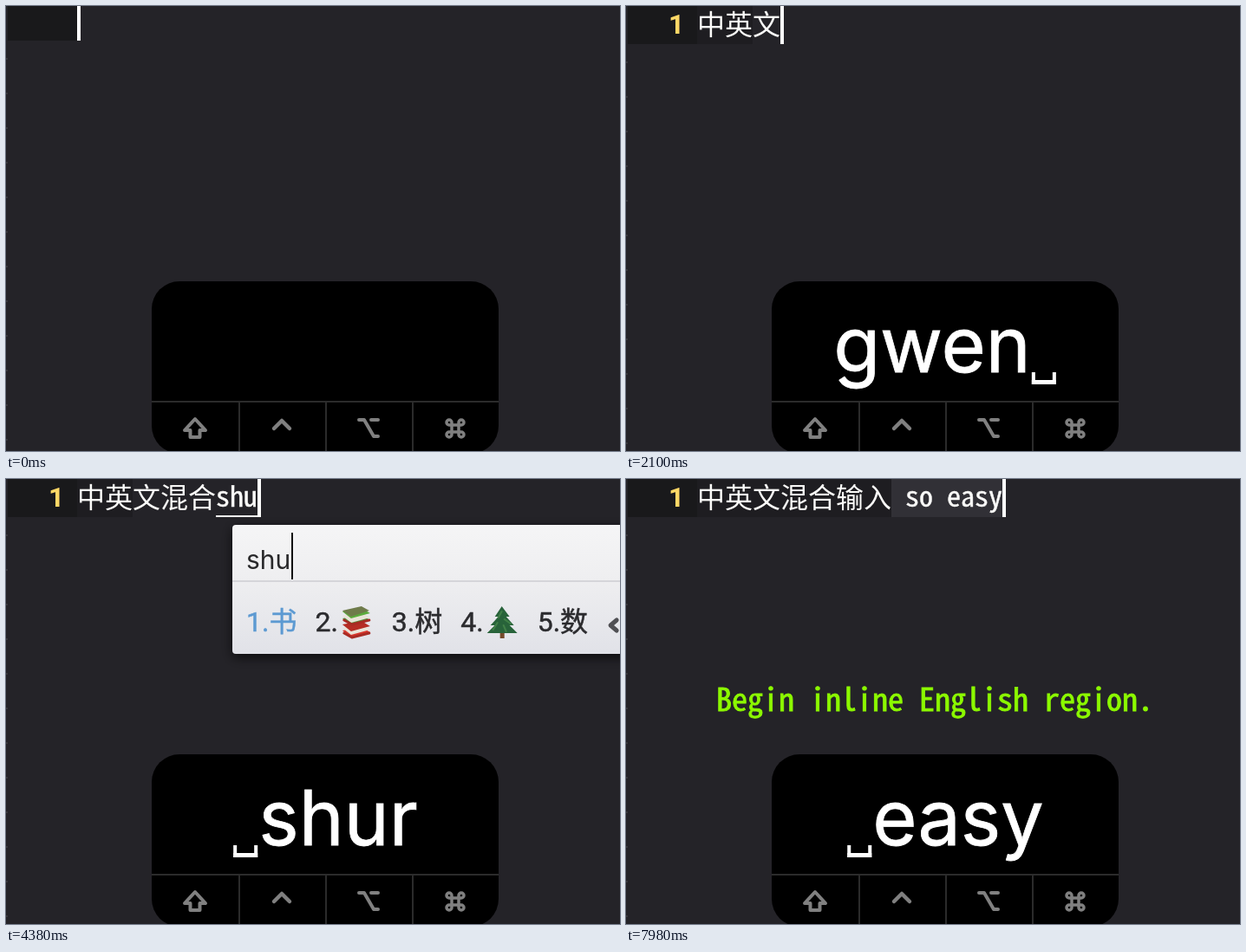
Recreate the animation shown at these times as an HTML page with a canvas. Size 708 by 514 pixels, loop 8 s.

```html
<!DOCTYPE html>
<html lang="zh-CN">
<head>
<meta charset="utf-8">
<style>
  html, body { margin: 0; width: 708px; height: 514px; overflow: hidden; background: #242328; }
  canvas { display: block; }
</style>
</head>
<body>
<canvas id="stage" width="708" height="514"></canvas>
<script>
const ctx = document.getElementById('stage').getContext('2d');
const LOOP = 8000, LAG = 60, LEFT = 82, CELL = 16;
const MONO = '"Noto Sans Mono CJK SC", "Noto Sans CJK SC", monospace';
const CJK = '"Noto Sans CJK SC", sans-serif';
const SANS = 'Roboto, ' + CJK;
const UI = 'Inter, sans-serif';

const KEYS = 'zhongyingwen hunhe shuru  so easy';
const TIMES = [60, 240, 420, 600, 780, 960, 1140, 1260, 1380, 1560, 1680, 1800, 1980,
  2760, 2940, 3120, 3360, 3480, 3660, 4020, 4140, 4260, 4380, 4500, 4740,
  5100, 5820, 6180, 6720, 7080, 7200, 7380, 7680];
const WORDS = [["zhong'ying'wen", '中英文'], ["hun'he", '混合'], ["shu'ru", '输入']];
const POPUP_AT = 2520, MESSAGE_AT = 5880;

const CANDIDATES = {
  "z": '在 子 自 怎 走',
  "zh": '这 着 中 只 中国',
  "zho": '中 周 种 重 中国',
  "zhon": '中 种 重 众 钟',
  "zhong": '中 种 重 众 钟',
  "zhong'y": '重要 终于 中央 中有 中医',
  "zhong'yi": '中医 中意 忠义 重义 中一',
  "zhong'yin": '中音 重音 中英 终因 中印',
  "zhong'ying": '中英 中影 中营 重影 中应',
  "zhong'ying'w": '中英文 中英 中影 中 种',
  "zhong'ying'we": '中英文 中英 中影 中 种',
  "zhong'ying'wen": '中英文 中英 中影 中 种',
  "h": '和 好 会 还 很',
  "hu": '会 或 湖 户 胡',
  "hun": '混 婚 魂 昏 hung',
  "hun'h": '混合 婚后 混好 混 婚',
  "hun'he": '混合 浑河 混 婚 魂',
  "s": '是 说 上 时 三',
  "sh": '是 说 上 时 事',
  "shu": '书 📚 树 🌲 数',
  "shu'r": '输入 熟人 树人 书 数',
  "shu'ru": '输入 书入 书 树 数',
};

function rect(x, y, w, h, color) {
  ctx.fillStyle = color;
  ctx.fillRect(x, y, w, h);
}

function text(s, x, y, font, color, weight = 0) {
  ctx.font = font;
  ctx.fillStyle = ctx.strokeStyle = color;
  ctx.fillText(s, x, y);
  if (weight) {
    ctx.lineWidth = weight;
    ctx.strokeText(s, x, y);
  }
  return ctx.measureText(s).width;
}

function line(d, x, y, width, color) {
  ctx.save();
  ctx.translate(x, y);
  ctx.lineWidth = width;
  ctx.lineCap = ctx.lineJoin = 'round';
  ctx.strokeStyle = color;
  ctx.stroke(new Path2D(d));
  ctx.restore();
}

function shape(d, x, y, color) {
  ctx.save();
  ctx.translate(x, y);
  ctx.fillStyle = color;
  ctx.fill(new Path2D(d));
  ctx.restore();
}

const typedBy = t => TIMES.filter(k => k <= t).length;

// Committed text and pending syllables after n keystrokes
function compose(n) {
  let done = '';
  for (const [word, out] of WORDS) {
    const size = word.replace(/'/g, '').length;
    if (n <= size) {
      return { done, pending: n ? word.match(new RegExp(`^(?:'?\\w){${n}}`))[0] : '', direct: '' };
    }
    n -= size + 1;
    done += out;
  }
  return { done, pending: '', direct: KEYS.slice(-8).slice(0, n) };
}

function books(x, y) {
  const layers = [['#d8362c', 24], ['#e9e4d8', 21], ['#b52d25', 17], ['#4f8f3a', 10], ['#e9e4d8', 7], ['#5cab3d', 2]];
  layers.forEach(([color, dy]) => shape('M2 4 L24 0 L34 6 L12 12 Z', x, y + dy, color));
  line('M4 8 L13 13 L33 8 M4 23 L13 28 L33 23', x, y + 8, 3, '#a82b24');
  shape('M2 4 L24 -1 L33 4 L12 11 Z', x, y + 1, '#6f7b4b');
}

function tree(x, y) {
  rect(x + 15, y + 28, 5, 9, '#74492a');
  shape('M17 0 L26 12 L22 12 L31 22 L26 22 L35 31 L0 31 L9 22 L4 22 L13 12 L9 12 Z', x, y, '#28633a');
  line('M17 6 L13 13 M20 15 L27 20 M12 19 L7 27 M19 22 L22 29', x, y, 2, '#418047');
}

function panel(pending, x, y) {
  const font = '32px ' + SANS;
  const items = CANDIDATES[pending].split(' ').map((s, i) => `${i + 1}.${s}`);
  const isIcon = s => /[📚🌲]/u.test(s);
  ctx.font = font;
  const widths = items.map(s => isIcon(s) ? ctx.measureText('2.').width + 41 : ctx.measureText(s).width);
  const end = x + 16 + widths.reduce((a, b) => a + b + 21);

  const fill = ctx.createLinearGradient(0, y, 0, y + 149);
  fill.addColorStop(0, '#f5f5f6');
  fill.addColorStop(.44, '#eeeef0');
  fill.addColorStop(1, '#e1e2e8');
  ctx.save();
  ctx.shadowColor = 'rgba(0,0,0,.65)';
  ctx.shadowBlur = 14;
  ctx.shadowOffsetY = 4;
  ctx.fillStyle = fill;
  ctx.beginPath();
  ctx.roundRect(x, y, end + 78 - x, 149, 4);
  ctx.fill();
  ctx.restore();
  rect(x, y + 64, end + 78 - x, 2, '#d5d5d9');

  const w = text(pending, x + 16, y + 51, '30px ' + UI, '#28282a');
  rect(Math.round(x + 17 + w), y + 9, 2, 54, '#111');

  let cx = x + 16;
  items.forEach((s, i) => {
    const label = isIcon(s) ? s.slice(0, 2) : s;
    const lw = text(label, cx, y + 123, font, i ? '#2b2b2e' : '#5d9ad2', .5);
    if (s.includes('📚')) books(cx + lw + 3, y + 94);
    if (s.includes('🌲')) tree(cx + lw + 4, y + 94);
    cx += widths[i] + 21;
  });
  line('M7 -6 L0 0 L7 6', end + 26, y + 116, 5, '#505054');
  line('M0 -6 L7 0 L0 6', end + 52, y + 116, 5, '#505054');
}

function editor(t) {
  const { done, pending, direct } = compose(typedBy(t - LAG));
  const row = done ? 44 : 40;
  const popup = t >= POPUP_AT && done === '中英文';
  const floating = popup && pending;
  const gutter = floating ? 172 : row;
  const base = done ? 32 : 31;
  const font = '32px ' + MONO;
  const end = LEFT + done.length * 32;

  rect(0, 0, 708, 514, '#242328');
  rect(2, 0, LEFT - 2, gutter, '#19191b');
  for (let y = gutter + 20; y < 514; y += 40) rect(0, y, 2, 2, '#38373c');

  if (done) {
    rect(LEFT, 0, direct ? end - LEFT : 64, row, '#1e1d21');
    text('1', 49, 32, 'bold 32px ' + SANS, '#ffd866');
    text(done, LEFT, 33, '300 32px ' + CJK, '#fcfcfa');
  }
  if (direct) {
    rect(end, 0, direct.length * CELL, row, '#313036');
    text(direct, end, base, font, '#fcfcfa', .5);
  }

  const px = floating ? LEFT : end;
  const py = floating ? 134 : 0;
  if (pending) {
    text(pending, px, py + base, font, '#fcfcfa', .5);
    rect(px, (floating ? 172 : row) - 2, pending.length * CELL, 2, '#fcfcfa');
  }
  const chars = direct.length + (floating ? 0 : pending.length);
  rect(end + chars * CELL, 0, 4, row, '#fff');

  if (popup) {
    rect(LEFT, 44, 32, 88, '#222125');
    rect(114, 44, 363, 44, '#323037');
    rect(114, 88, 363, 44, '#1a191c');
    for (const y of [77, 121]) text('中英文', 132, y, 'bold ' + font, '#fcfcfa');
  }
  if (pending) panel(pending, end + 19, floating ? 49 : row + 9);
  if (t >= MESSAGE_AT) text('Begin inline English region.', 104, 267.5, '36px ' + MONO, '#8cf900', .9);
}

function keyText(t) {
  const n = typedBy(t);
  let s = KEYS.slice(n > 6 ? n - 5 : 0, n);
  // Keys from before a long pause drop out
  if (n > 27) s = KEYS.slice(Math.max(24, n - 5), n);
  const font = '88px ' + UI;
  const parts = s.split(/( )/).filter(Boolean);
  ctx.font = font;
  const widths = parts.map(p => p === ' ' ? 30 : ctx.measureText(p).width);
  let x = 368 - widths.reduce((a, b) => a + b, 0) / 2;
  parts.forEach((p, i) => {
    if (p === ' ') {
      rect(x + 1, 423, 4, 14, '#fff');
      rect(x + 25, 423, 4, 14, '#fff');
      rect(x + 1, 432, 28, 5, '#fff');
    } else {
      text(p, x, 423, font, '#fff', .8);
    }
    x += widths[i];
  });
}

function keyboard(t) {
  ctx.fillStyle = '#000';
  ctx.beginPath();
  ctx.roundRect(168, 318, 400, 199, 32);
  ctx.fill();
  rect(168, 456, 400, 2, '#2b2b2b');
  for (const x of [268, 368, 468]) rect(x, 458, 2, 56, '#2b2b2b');

  const gray = '#808080';
  line('M0 -11 L12 2 H5.5 V10 H-5.5 V2 H-12 Z', 218, 488, 4, gray);
  line('M-9 5 L0 -4 L9 5', 318, 483, 4.5, gray);
  line('M-11 -10 H-5 L6 9 H11 M3 -10 H11', 418, 488, 4, gray);
  line('M-4 -4 H4 V4 H-4 Z M-4 -4 V-7 A3 3 0 1 0 -7 -4 H-4 M4 -4 H7 A3 3 0 1 0 4 -7 V-4' +
    ' M4 4 V7 A3 3 0 1 0 7 4 H4 M-4 4 H-7 A3 3 0 1 0 -4 7 V4', 518, 488, 3.5, gray);
  keyText(t);
}

const start = performance.now();
function draw() {
  const t = (performance.now() - start) % LOOP;
  editor(t);
  keyboard(t);
  requestAnimationFrame(draw);
}
draw();
</script>
</body>
</html>
```
